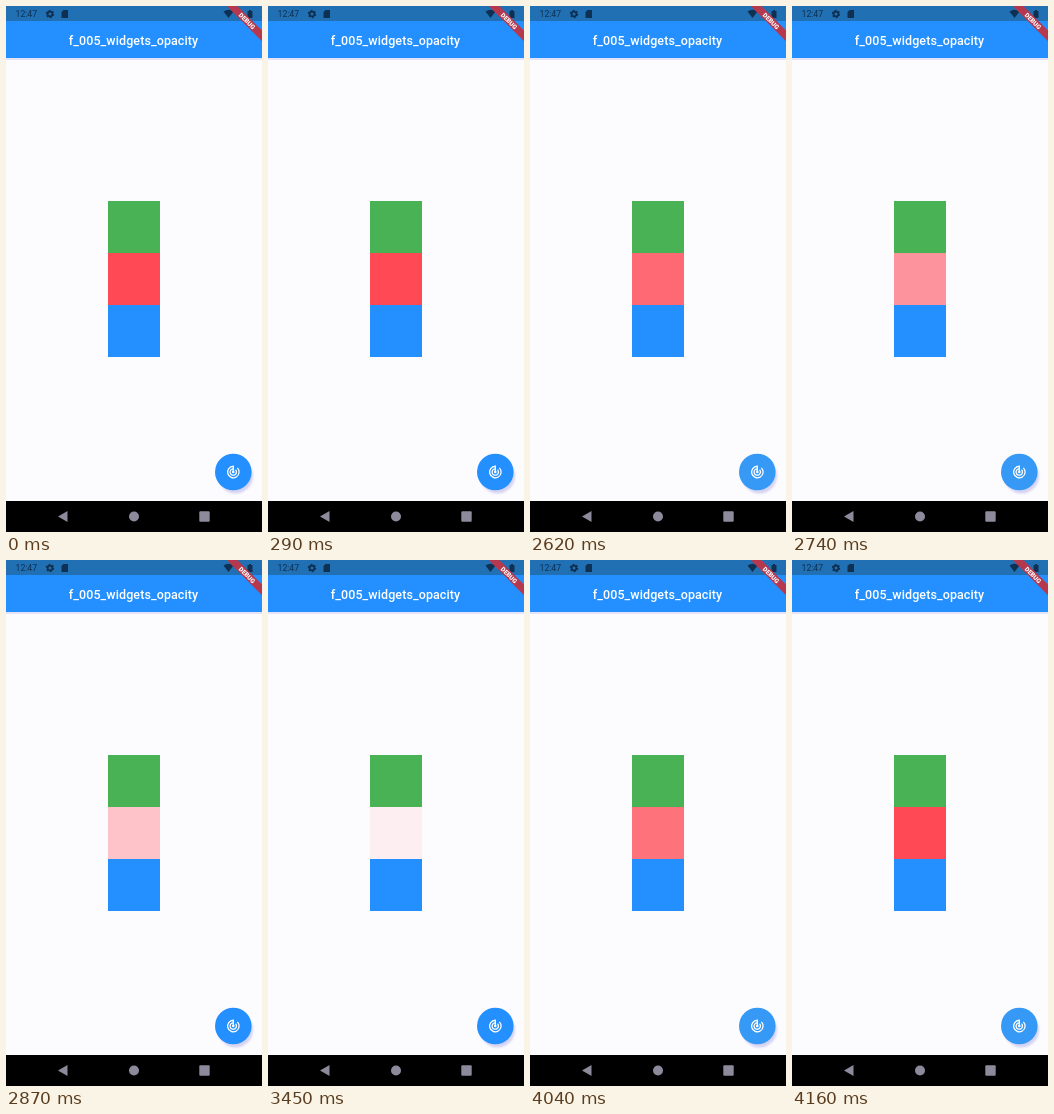
Animation, 256 px wide and 526 px high, one loop 5.58 s. Source, as an HTML page:

```html
<!DOCTYPE html>
<html lang="en">
<head>
<meta charset="utf-8">
<title>Widget opacity</title>
<style>
  html, body { margin: 0; width: 100%; height: 100%; overflow: hidden; background: #fcfcff; }
  svg { display: block; width: 100%; height: 100%; }
  text { font-family: Roboto, "Open Sans", sans-serif; }
</style>
</head>
<body>
<svg viewBox="0 0 256 526">
  <defs>
    <filter id="blur" x="-30%" y="-30%" width="160%" height="160%">
      <feGaussianBlur stdDeviation="1"/>
    </filter>
  </defs>
  <rect width="256" height="526" fill="#fcfcff"/>

  <!-- App bar -->
  <rect y="52" width="256" height="2" fill="#e4e3f7"/>
  <rect y="15" width="256" height="37" fill="#2490ff"/>
  <text x="127.5" y="38.5" text-anchor="middle" font-size="12.5" font-weight="500"
        letter-spacing=".09" fill="#fff">f_005_widgets_opacity</text>

  <!-- Status bar -->
  <rect width="256" height="15" fill="#2270b4"/>
  <g fill="#0e3052">
    <text x="9.5" y="11" font-size="8.7">12:47</text>
    <circle cx="44" cy="8" r="2.4" fill="none" stroke="#0e3052" stroke-width="1.8"/>
    <circle cx="44" cy="8" r="3.6" fill="none" stroke="#0e3052" stroke-width="1.2" stroke-dasharray="1.9 1.87"/>
    <path d="M57.5 4H62V12H55.5V6Z"/>
    <path d="M217.5 5.5Q222.5 2 227.5 5.5L222.5 12Z"/>
    <path d="M241.5 5H243V4H245V5H246.5V12H241.5Z"/>
  </g>

  <!-- Debug ribbon -->
  <g transform="translate(256 0) rotate(45)">
    <rect x="-26" y="17.4" width="52" height="7.5" fill="#b5384e"/>
    <text y="23.5" text-anchor="middle" font-size="6.3" font-weight="900" fill="#fff">DEBUG</text>
  </g>

  <!-- Boxes -->
  <rect x="102" y="195" width="52" height="52" fill="#49b255"/>
  <rect id="box" x="102" y="247" width="52" height="52" fill="#ff4a55"/>
  <rect x="102" y="299" width="52" height="52" fill="#2490ff"/>

  <!-- Floating button -->
  <circle cx="229.5" cy="470" r="17.5" fill="#d5d2f2" filter="url(#blur)"/>
  <circle id="button" cx="227.3" cy="466" r="18.3"/>
  <g transform="translate(227.3 466) scale(.64)" fill="none" stroke="#fff" stroke-width="2">
    <path d="M6.4-6.4A9 9 0 1 1 0-9V0M3.5-3.5A5 5 0 1 1-1-4.9"/>
    <circle r="2" fill="#fff" stroke="none"/>
  </g>

  <!-- Navigation bar -->
  <rect y="495" width="256" height="31" fill="#000"/>
  <g fill="#8d8a9c">
    <path d="M52 510.5L61.5 505V516Z"/>
    <circle cx="128" cy="510.5" r="5"/>
    <rect x="193.3" y="505.3" width="10.4" height="10.4" rx="1"/>
  </g>
</svg>
<script>
  const LOOP = 5580;
  const FADED = 0.08;
  const box = document.getElementById("box");
  const button = document.getElementById("button");

  const ramp = (t, start, end, from, to) =>
    from + (to - from) * Math.min(1, Math.max(0, (t - start) / (end - start)));

  function boxOpacity(t) {
    if (t < 2620) return 1;
    if (t < 3700) return ramp(t, 2620, 2990, 0.82, FADED);
    return ramp(t, 3680, 4160, FADED, 1);
  }

  function render(t) {
    const pressed = (t >= 2620 && t < 2830) || t >= 3700;
    box.setAttribute("opacity", boxOpacity(t));
    button.setAttribute("fill", pressed ? "#3699f5" : "#2490ff");
  }

  const start = performance.now();
  function tick() {
    render((performance.now() - start) % LOOP);
    requestAnimationFrame(tick);
  }
  tick();
</script>
</body>
</html>
```
